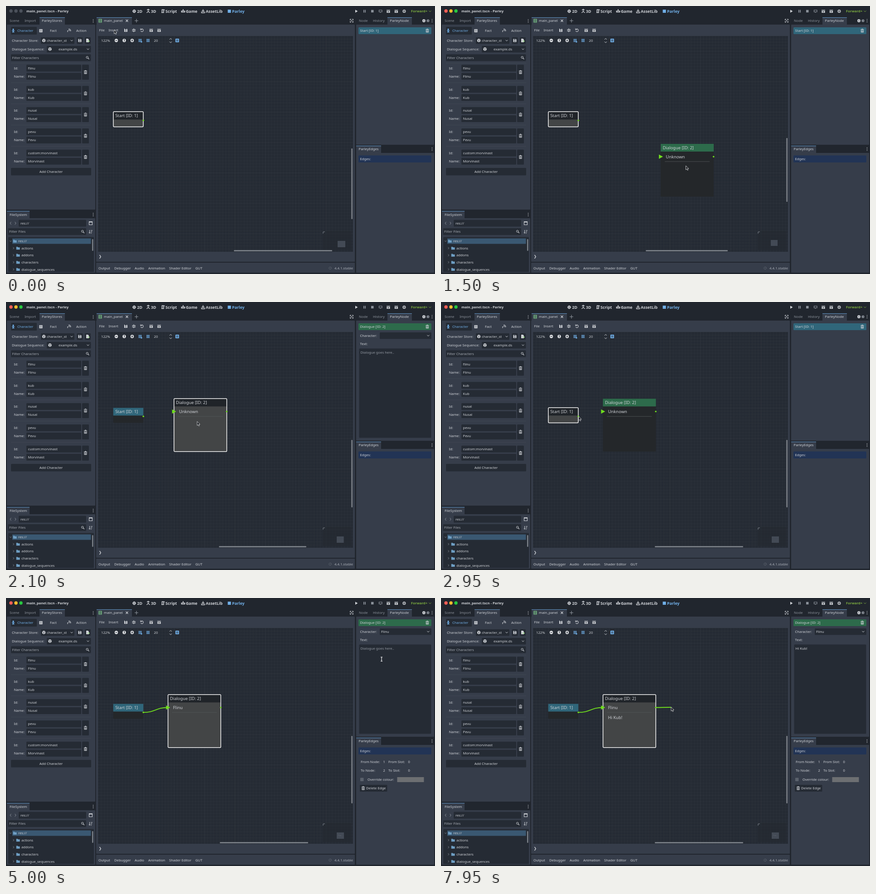
Write an HTML page that moves like this. It is 947 px wide and 591 px high and loops after 8 s.

```html
<!DOCTYPE html>
<html lang="en">
<head>
<meta charset="utf-8">
<title>Dialogue editor</title>
<style>
  html, body { margin: 0; width: 100%; height: 100%; overflow: hidden; background: #21262e; }
  svg { display: block; width: 100%; height: 100%; }
  text { font-family: "Noto Sans", "Open Sans", sans-serif; white-space: pre; }
</style>
</head>
<body>
<svg id="stage" viewBox="0 0 947 591"></svg>
<script>
const LOOP = 8000;
const BASE = '#363d4a', FIELD = '#252b34', BAR = '#21262e', POPUP = '#1d2229';
const FG = '#ced1d6', DIM = '#8b919a', BLUE = '#70aee6', LIME = '#6fdc1e';
const START = '#30667a', GREEN = '#2d6b4b';
const NAMES = ['Flinu', 'Kub', 'Nusal', 'Pevu', 'Morvinast'];

const rect = (x, y, w, h, fill, more = '') =>
  `<rect x="${x}" y="${y}" width="${w}" height="${h}" fill="${fill}" ${more}/>`;
const field = (x, y, w, h, fill = FIELD) => rect(x, y, w, h, fill, 'rx="1.5"');
const text = (x, cy, s, fill = FG, size = 7.7, more = '') =>
  `<text x="${x}" y="${cy + size * .36}" font-size="${size}" fill="${fill}" ${more}>${s}</text>`;
const line = (d, color = FG, w = 1, fill = 'none') =>
  `<path d="${d}" stroke="${color}" stroke-width="${w}" fill="${fill}"/>`;
const shape = (d, color = FG) => `<path d="${d}" fill="${color}"/>`;
const dot = (x, y, r, fill, more = '') => `<circle cx="${x}" cy="${y}" r="${r}" fill="${fill}" ${more}/>`;
const group = (id, body) => `<g id="${id}">${body}</g>`;

const down = (x, y, c = FG) => line(`M${x - 2.5} ${y - 1.2}l2.5 2.5 2.5-2.5`, c);
const right = (x, y, c = DIM) => line(`M${x - 1} ${y - 2.2}l2 2.2-2 2.2`, c, .9);
const dots = (x, y) => [-3, 0, 3].map(d => dot(x, y + d, .8, FG)).join('');
const trash = (x, y) => line(`M${x - 3.6} ${y - 2.6}h7.2M${x - 1.3} ${y - 3.8}h2.6`, FG, 1.1) +
  line(`M${x - 2.6} ${y - 1.2}v4.6h5.2v-4.6M${x - .8} ${y - 1}v4M${x + .8} ${y - 1}v4`, FG, 1);
const save = (x, y) => shape(`M${x - 3.5} ${y - 3.5}h5.5l1.5 1.5v5.5h-7z`) +
  rect(x - 1.8, y - 3.5, 3.2, 2.2, BASE) + dot(x, y + 1.3, 1.2, BASE);
const search = (x, y) => dot(x - .8, y - .8, 2.2, 'none', `stroke="${FG}"`) +
  line(`M${x + .8} ${y + .8}l2.6 2.6`, FG, 1.3);
const cube = (x, y) => shape(`M${x} ${y - 4}l3.6 1.8v4.2l-3.6 2-3.6-2v-4.2z`) +
  line(`M${x - 3} ${y - 1.8}l3 1.5 3-1.5M${x} ${y}v3`, FIELD, .8);
const clapper = (x, y, c = FG) => rect(x - 3.6, y - 1, 7.2, 4.5, c) +
  line(`M${x - 3.6} ${y - 2.5}h7.2`, c, 1.5) + line(`M${x - 1.8} ${y - 3.3}l1 1.6M${x + 1} ${y - 3.3}l1 1.6`, BAR, .8) +
  shape(`M${x - 1} ${y - .2}l2.5 1.5-2.5 1.5z`, BAR);
const folder = (x, y) => shape(`M${x - 3.8} ${y - 3}h3l1 1.2h3.8v5h-7.8z`, '#6f9fc4');
const grid = (x, y, c = BLUE) =>
  line(`M${x - 3.5} ${y - 2.5}h7M${x - 3.5} ${y}h7M${x - 3.5} ${y + 2.5}h7M${x - 2.5} ${y - 3.5}v7M${x} ${y - 3.5}v7M${x + 2.5} ${y - 3.5}v7`, c, .9);

const dock = (x, y, w, bottom) => rect(x, y, w, bottom - y, BASE, 'rx="1"');
const activeTab = (x, y, w) => rect(x, y, w, 16.5, BASE) + rect(x, y, w, 1, '#5f92c2');

function titleBar() {
  const bold = 'font-weight="600"';
  const tab = (x, s, c = FG) => text(x, 11.5, s, c, 8.8, bold);
  return ['#fe5f57', '#febc2e', '#28c840'].map((c, i) => dot(11 + 11 * i, 11, 3.7, c, 'class="light"')).join('') +
    text(45, 11.5, 'main_panel.tscn - Parley', FG, 7.7, bold) +
    dot(283, 11.5, 2.8, 'none', `stroke="${FG}" stroke-width="1.4"`) + line('M279 11.5h8M283 7.5v8', FG, 1) + tab(289.5, '2D') +
    line('M314 7.5v4.5l-3.5 3M314 12l3.5 3M311 9l3-2 3 2', FG, 1.4) + tab(320, '3D') +
    line('M343 14.5h5v-6h2.5M344.5 14v-6h4', FG, 1.6) + tab(352, 'Script') +
    line('M387.5 13.5h7v-2.5h-7zM391 11v-4', FG, 1.7) + tab(397, 'Game') +
    line('M435 7v5M432.5 10l2.5 2.5 2.5-2.5M431.5 12v3h7v-3', FG, 1.3) + tab(441, 'AssetLib') +
    rect(489.5, 8, 7, 7, BLUE) + tab(499, 'Parley', BLUE) +
    shape('M771 8.2l5.5 3.3-5.5 3.3z') + rect(789, 8.5, 1.8, 6, DIM) + rect(792.2, 8.5, 1.8, 6, DIM) +
    rect(806, 8.7, 5.5, 5.5, DIM) + line('M823.5 9h6.5v4h-6.5zM826.5 13v2', DIM, 1.2) +
    clapper(844, 11.5) + clapper(861.5, 11.5) + dot(879, 11.5, 2.8, 'none', `stroke="${FG}" stroke-width="1.5"`) + dot(879, 11.5, 1, FG) +
    text(894, 11.5, 'Forward+', '#79a93f', 7.7, bold) + down(936, 11.5, '#79a93f');
}

function entry(name, i) {
  const y = 137 + 46.8 * i, id = (i === 4 ? 'custom:' : '') + name.toLowerCase();
  return text(17.5, y, 'Id:') + field(45, y - 7.5, 121, 15) + text(48.5, y, id) +
    text(17.5, y + 18, 'Name:') + field(45, y + 10.5, 121, 15) + text(48.5, y + 18, name) +
    field(168, y - 7.5, 15, 33) + trash(175.5, y + 9) +
    (i < 4 ? line(`M11 ${y + 32}h177`, '#444b57', .7) : '');
}

function leftDock() {
  const folders = ['actions', 'addons', 'characters', 'dialogue_sequences'];
  return text(8, 32.5, 'Scene', DIM) + text(41, 32.5, 'Import', DIM) + activeTab(74, 25, 56) + text(79, 32.5, 'ParleyStores') +
    dots(192.5, 33) + dock(2, 41, 195, 449) +
    field(11, 46, 57, 17) + dot(16, 51.5, 1.7, BLUE) + line('M13 54.5h6M16 53v3l-2 2.5M16 56l2 2.5', BLUE, 1.3) +
    text(25, 54.5, 'Character', BLUE) +
    rect(73.5, 51, 7, 7, FG) + line('M75 53h4M75 55.5h4', BASE, .8) + text(97, 54.5, 'Fact') +
    line('M136 57.5v-3h2M138 52.5c2 0 3 1 3 3M138 50.5c3 0 5 2 5 5', FG, 1.1) + text(155, 54.5, 'Action') +
    text(13, 76, 'Character Store:') + field(77, 69, 74, 14.5) + cube(83.5, 76) + text(90, 76, 'character_st') + down(145, 76) +
    field(156.5, 69, 13, 14.5) + save(163, 76) + field(174, 69, 13, 14.5) +
    shape('M177 72h4l2 2v6h-6z') + line('M180 77.5h4M182.5 75.5l2 2-2 2', '#8fd37a', 1) +
    text(13, 95, 'Dialogue Sequence:') + field(90, 88, 97.5, 14.5) + cube(97, 95) + text(116, 95, 'example.ds') + down(181, 95) +
    field(11, 106.5, 176.5, 15) + text(13.5, 114, 'Filter Characters', '#a5aab2') + search(180, 114) +
    line('M11 126h177', '#444b57', .7) + NAMES.map(entry).join('') +
    field(11, 357, 177, 16.5) + text(99.5, 365, 'Add Character', FG, 7.7, 'text-anchor="middle"') +
    activeTab(2, 452, 50) + text(8, 460, 'FileSystem') + dots(192.5, 460) + dock(2, 468, 195, 588) +
    line('M11.5 476l-2.5 3 2.5 3M19.5 476l2.5 3-2.5 3', DIM) + field(28, 471.5, 149, 15) + text(32, 479, 'res://') +
    line('M183.5 475.5h7v7h-7z', FG, 1.1) + rect(183, 475, 8, 2.2, FG) +
    field(4.5, 490, 172.5, 15) + text(7, 497.5, 'Filter Files', '#a5aab2') + search(169.5, 497.5) +
    line('M184.5 494v7M183 499.5l1.5 1.8 1.5-1.8M187 495h4M187 498h3M187 501h2', FG) +
    field(5, 509.5, 189, 77) + rect(14, 512.5, 173.5, 12, '#3a5872') + rect(190, 514, 2.6, 26, '#7b8189', 'rx="1.3"') +
    line('M8 517.5l2 2 2-2', DIM, .9) + folder(19.5, 518.5) + text(27, 518.5, 'res://') +
    folders.map((s, i) => {
      const y = 534 + 15.6 * i;
      return right(16.5, y) + folder(26.5, y) + text(34, y, s);
    }).join('');
}

function centre() {
  const round = (x, mark) => dot(x, 76, 3.7, '#e4e6e9') + line(mark, FIELD, 1.2);
  const tabs = [[204, 'Output'], [239, 'Debugger'], [284, 'Audio'], [314, 'Animation'], [360, 'Shader Editor'], [418, 'GUT']];
  return activeTab(200, 25, 78) + line('M205 29h6v7h-6zM205 31.3h6M205 33.7h6', '#7fce8a', 1.1) + text(216, 32.5, 'main_panel') +
    line('M264.5 30l5 5M269.5 30l-5 5', FG, 1.2) + line('M284 32.5h8M288 28.5v8', DIM, 1.2) +
    line('M759.5 31.5v-2.500h2.500M764 29h2.500v2.500M766.5 33.500v2.500h-2.500M762 36h-2.500v-2.500M760 29.5l6 6M766 29.500l-6 6', FG, .9) +
    dock(199, 41, 571, 564) + dock(199, 566, 571, 588) +
    text(205.5, 53.5, 'File') + text(226.5, 53.5, 'Insert') + save(264.5, 53.5) +
    line('M278.5 52h7.500M278.5 55h7.500M282 49.500v2M282 55.500v2', FG, 1.3) +
    line('M298 51.500a3 3 0 1 1-.5 3.500M297 49.500v2.700h2.700', FG, 1.1) + clapper(320.5, 53.5) + clapper(338, 53.5) +
    rect(203, 66, 563, 476, FIELD) + rect(203, 66, 563, 476, 'url(#minor)') + rect(203, 66, 563, 476, 'url(#major)') +
    text(210, 76, '122%') + round(243.5, 'M241.300 76h4.400') + round(261, 'M260.300 74.500l1-.700v4.500') + round(278.5, 'M276.300 76h4.400M278.500 73.800v4.400') +
    grid(296, 76) + dot(299, 79, 1.7, BLUE) + grid(313.5, 76) + text(326.5, 76, '20') +
    line('M361 74l2.500-2.700 2.500 2.700M361 78.500l2.500 2.700 2.500-2.700', FG, 1) + grid(378, 76) + line('M374.500 72.500h7v7h-7z', BLUE) +
    text(204.5, 552, '❯', FG, 8) + tabs.map(([x, s]) => text(x, 578.5, s)).join('') +
    dot(715.5, 578, 2.5, 'none', 'stroke="#59606b" stroke-width="1.500" stroke-dasharray="1.300 .700"') + text(725, 578.5, '4.4.1.stable', '#a9aeb6');
}

function rightDock() {
  const header = (label, color) => field(778, 47, 161, 15, color) + text(781.5, 54.5, label) + trash(930, 54.5);
  const edge = (y, end, value) => text(783, y, `${end} Node:`) + text(832.5, y, value) + text(844, y, `${end} Slot:`) + text(887.5, y, '0');
  return text(779, 32.5, 'Node', DIM) + text(810, 32.5, 'History', DIM) + activeTab(842, 25, 54) + text(847.5, 32.5, 'ParleyNode') +
    dot(922.5, 32.5, 3.4, FG) + line('M923.500 30.800l-1.800 1.700 1.800 1.700', BAR, .9) +
    dot(931.5, 32.5, 3, DIM) + line('M930.700 30.800l1.800 1.700-1.800 1.700', BAR, .9) + dots(940.5, 32.5) +
    dock(773, 41, 172, 306) +
    group('startPanel', header('Start [ID: 1]', START)) +
    group('dialoguePanel', header('Dialogue [ID: 2]', GREEN) +
      text(781.5, 74, 'Character:') + field(825, 67, 114, 14.5) + text(828, 74, '', FG, 7.7, 'id="choice"') + down(932, 74) +
      text(781.5, 92.5, 'Text:') + field(779.5, 102.5, 159, 197) +
      text(782.5, 111.5, 'Dialogue goes here..', '#9298a1', 7.7, 'id="placeholder"') + text(782.5, 111.5, '', FG, 7.7, 'id="input"') +
      group('focus', rect(780, 103, 158, 196, 'none', 'rx="1.500" stroke="#6ba3d6" stroke-width="1.200"') +
        rect(0, 107, .9, 10, FG, 'id="caret"'))) +
    activeTab(773, 308, 55) + text(778.5, 315.5, 'ParleyEdges') + dots(940.5, 315.5) + dock(773, 324, 172, 588) +
    field(778, 329.5, 161, 15.5, '#223455') + text(781.5, 337.5, 'Edges:') +
    group('edges', edge(361, 'From', '1') + edge(380, 'To', '2') +
      rect(782, 396.5, 7.5, 7.5, '#5a616c', 'rx="1"') + text(798, 400.5, 'Override colour:') + rect(863.5, 395, 59, 11, '#6d6f72') +
      field(781, 412, 60.5, 15) + trash(788.5, 419.5) + text(795, 419.5, 'Delete Edge'));
}

const node = (id, w, h, label, color, body) => group(id,
  rect(0, 0, w, h, '#24272a', `id="${id}Body" rx="1.500"`) + rect(0, 0, w, 17, color, `id="${id}Title"`) +
  text(4.5, 8.7, label, FG, 9.4) + body +
  rect(.2, -.4, w - .4, h + .4, 'none', `id="${id}Border" rx="1.800" stroke="#f4f4f4" stroke-width="1.500"`));

function graph() {
  return rect(699, 496, 63, 42, '#232830', 'opacity=".55"') + line('M700 502v-4h4', '#8b919a', .9) +
    rect(0, 0, 0, 0, '#434a55', 'id="view"') + line('M733 523h2.500M736 524h4', '#5d646f', .8).replace('<path', '<path id="mapEdge"') +
    rect(0, 538.3, 0, 2.7, '#7b8088', 'id="hbar" rx="1.300"') + rect(762.3, 0, 2.7, 0, '#7b8088', 'id="vbar" rx="1.300"') +
    node('start', 66.5, 33, 'Start [ID: 1]', START, '') + dot(303.2, 252.2, 1.8, LIME) +
    line('', LIME, 1.8).replace('<path', '<path id="wire"') +
    node('dialogue', 117, 116.5, 'Dialogue [ID: 2]', GREEN,
      text(11.3, 28.5, '', FG, 9.4, 'id="speaker"') + line('M9 39h99', '#55585b', .8) + text(11.3, 50, '', FG, 9.4, 'id="speech"')) +
    group('ports', shape('M-4 23.500l9 4.700-9 4.700z', LIME) + dot(116.700, 28.2, 1.800, LIME)) +
    line('', LIME, 1.8).replace('<path', '<path id="newWire"');
}

const popup = (id, x, y, w, items) => group(id, rect(x, y, w, items.length * 15 + 6, POPUP, 'rx="1.500"') +
  rect(x + 2, y + 3, w - 4, 15, '#363d4a') + items.map((s, i) => text(x + 8, y + 10.5 + 15 * i, s)).join(''));

const tile = (id, size, alpha) =>
  `<pattern id="${id}" x="236.700" y="233.400" width="${size}" height="${size}" patternUnits="userSpaceOnUse">` +
  line(`M0 0V${size}M0 0H${size}`, `rgba(255,255,255,${alpha})`, .9) + '</pattern>';

const stage = document.getElementById('stage');
stage.innerHTML = `<defs>${tile('minor', 6.71, .05)}${tile('major', 67.1, .04)}</defs>` +
  rect(0, 0, 947, 591, BAR) + titleBar() + leftDock() + centre() + rightDock() + graph() +
  popup('menu', 227, 62, 78, ['Dialogue', 'Dialogue Option', 'Condition', 'Match', 'Action', 'Group', 'Jump', 'End']) +
  popup('options', 825, 82, 114, NAMES) +
  group('cursor', '<path d="M0 0v8.800l2-1.800 1.500 3 1.500-.700-1.500-3h2.800z" fill="#15181c" stroke="#e8e9eb" stroke-width=".800"/>') +
  group('ibeam', line('M-2-4.500h4M-2 4.500h4M0-4.500v9', '#e8e9eb', 1.3));

const el = Object.fromEntries([...stage.querySelectorAll('[id]')].map(e => [e.id, e]));
const lights = [...stage.querySelectorAll('.light')].map(e => [e, e.getAttribute('fill')]);
const set = (e, attrs) => { for (const k in attrs) e.setAttribute(k, attrs[k]); };
const show = (id, on) => { el[id].style.display = on ? '' : 'none'; };
const move = (id, x, y) => el[id].setAttribute('transform', `translate(${x} ${y})`);

function track(keys, t) {
  const i = keys.findIndex(k => k[0] > t);
  if (i < 0) return keys.at(-1).slice(1);
  if (i === 0) return keys[0].slice(1);
  const a = keys[i - 1], b = keys[i], u = (t - a[0]) / (b[0] - a[0]), e = u * u * (3 - 2 * u);
  return a.slice(1).map((v, n) => v + (b[n + 1] - v) * e);
}

const POINTER = [
  [0, 238.7, 52.5], [350, 238.7, 52.5], [550, 250, 70], [700, 250, 70], [1300, 540.5, 352.3], [1600, 540.5, 352.3],
  [2050, 422, 263.5], [2100, 422, 263.5], [2200, 408.5, 263.5], [2400, 408.5, 263.5], [2900, 303.8, 252.3], [3100, 303.8, 252.3],
  [3450, 357, 241], [3550, 357, 241], [3800, 412, 224], [3950, 412, 224], [4250, 859.2, 75.3], [4400, 859.2, 75.3],
  [4600, 852, 90], [4800, 852, 90], [5200, 806.5, 179], [6700, 806.5, 179], [6800, 582, 287], [6950, 582, 287],
  [7250, 418, 288], [7350, 418, 288], [7700, 474, 240.5], [7780, 474, 240.5], [7950, 508, 240.5]];
// time, node x y, horizontal bar start/length, vertical bar start/length, minimap view x y w h
const LAYOUT = [
  [649, 485, 304, 503, 217, 314, 156, 732, 518, 17, 14], [650, 485, 304, 452, 181, 291, 141, 728, 516, 15, 13],
  [1600, 485, 304, 452, 181, 291, 141, 728, 516, 15, 13], [2050, 370.6, 213.3, 470, 193, 304, 149, 730, 517, 15.6, 14],
  [2100, 370.6, 213.3, 470, 193, 304, 149, 730, 517, 15.6, 14], [2200, 357.4, 213.3, 472, 195, 304, 149, 730, 517, 16, 14]];
const KEYSTROKES = [5750, 5850, 6150, 6300, 6400, 6450, 6600];

const curve = (x1, y1, x2, y2) => {
  const c = (x2 - x1) / 2;
  return `M${x1} ${y1}C${x1 + c} ${y1} ${x2 - c} ${y2} ${x2} ${y2}`;
};

function select(id, on, color) {
  set(el[id + 'Title'], { fill: on ? '#202429' : color });
  set(el[id + 'Body'], { fill: on ? '#434546' : '#24272a' });
  show(id + 'Border', on);
}

function render(t) {
  const [px, py] = track(POINTER, t);
  const [x, y, hx, hw, vy, vh, mx, my, mw, mh] = track(LAYOUT, t);
  const inserted = t >= 650, linked = t >= 3450, named = t >= 4650;
  const startSelected = t < 1600 || (t >= 2850 && t < 3800);
  const typed = `Hi ${NAMES[1]}!`.slice(0, KEYSTROKES.filter(k => t >= k).length);
  const overText = t > 4800 && px > 780 && py > 103;

  lights.forEach(([e, c]) => set(e, { fill: t < 100 ? '#4b515b' : c }));
  show('menu', t >= 100 && t < 650);
  show('options', t >= 4400 && t < 4650);
  set(el.hbar, { x: hx, width: hw });
  set(el.vbar, { y: vy, height: vh });
  set(el.view, { x: mx, y: my, width: mw, height: mh });

  move('start', 236.7, 233.4);
  move('dialogue', x, y);
  move('ports', x, y);
  show('dialogue', inserted);
  show('ports', inserted);
  select('start', startSelected, START);
  select('dialogue', !startSelected, GREEN);
  show('startPanel', startSelected);
  show('dialoguePanel', !startSelected);
  show('edges', linked);
  show('mapEdge', linked);

  show('wire', t >= 3100);
  set(el.wire, { d: linked ? curve(303.2, 252.2, 357.4, 241.5) : curve(303.2, 252.2, px, py) });
  show('newWire', t >= 7800);
  set(el.newWire, { d: curve(474.1, 241.5, px, py + .5) });

  el.speaker.textContent = named ? NAMES[0] : 'Unknown';
  el.choice.textContent = named ? NAMES[0] : '';
  el.speech.textContent = el.input.textContent = typed;
  show('placeholder', !typed);
  show('focus', t >= 5200 && t < 7250);
  set(el.caret, { x: 782.7 + (typed ? el.input.getComputedTextLength() : 0) });

  show('cursor', !overText);
  show('ibeam', overText);
  move('cursor', px, py);
  move('ibeam', px, py);
}

function tick() {
  render(performance.now() % LOOP);
  requestAnimationFrame(tick);
}
tick();
</script>
</body>
</html>
```
